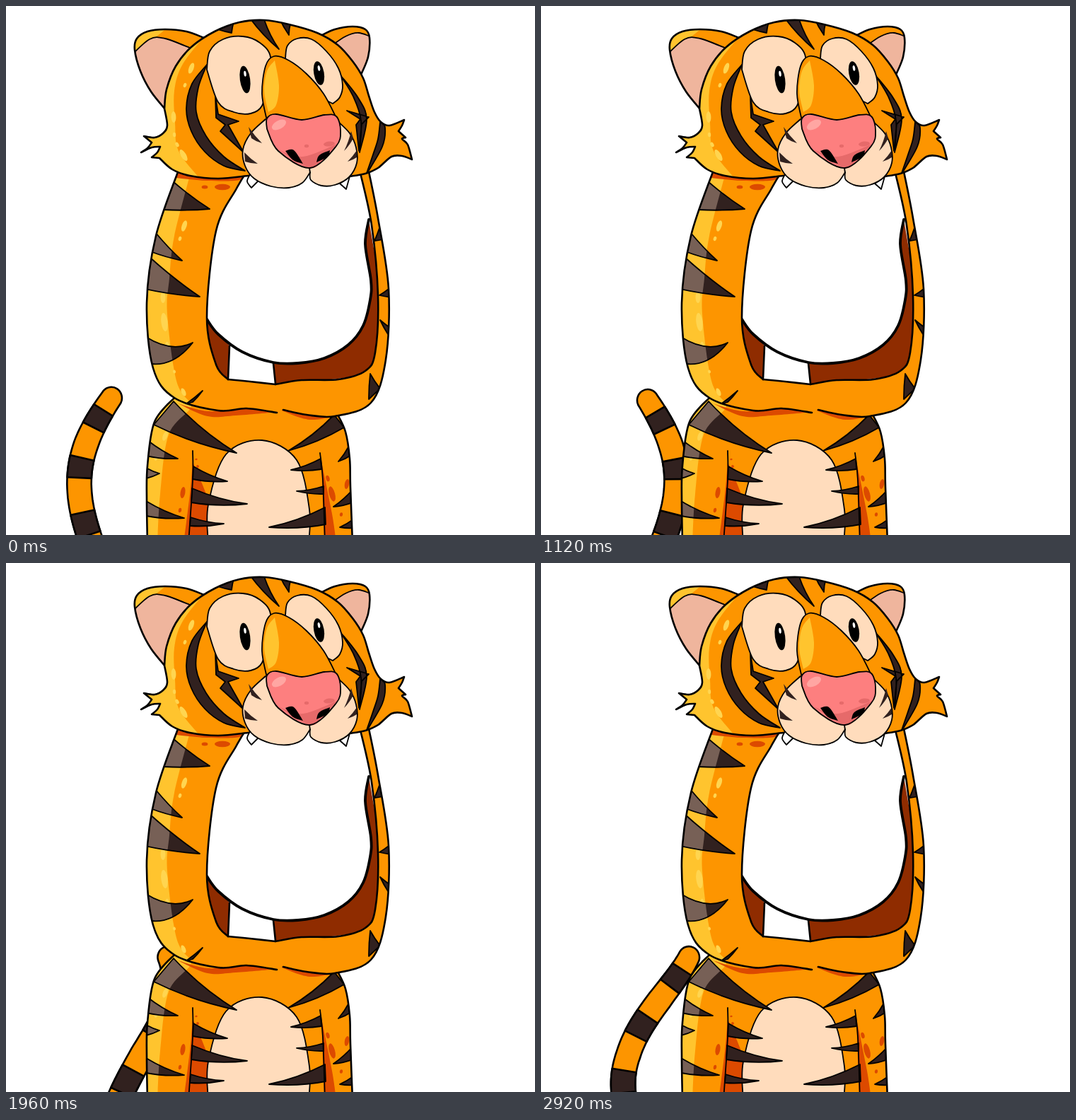
Write an HTML page that moves like this. It is 748 px wide and 748 px high and loops after 3 s.

```html
<!DOCTYPE html>
<html lang="en">
<head>
<meta charset="utf-8">
<title>Tiger</title>
<style>
html, body { margin: 0; width: 100%; height: 100%; overflow: hidden; background: #fff; }
svg { display: block; width: 100vw; height: 100vh; }
.line { fill: none; stroke: #000; stroke-width: 2.6; stroke-linecap: round; stroke-linejoin: round; }
.thin { stroke-width: 1.8; }
</style>
</head>
<body>
<svg id="stage" viewBox="0 0 748 748" xmlns="http://www.w3.org/2000/svg"></svg>
<script>
const C = {
  orange: '#fd9500', gold: '#ffc42e', glow: '#ffd550', dark: '#31211f', tint: '#776056',
  cream: '#ffdcbc', ear: '#efb59d', rust: '#dc4a00', brown: '#8f2c00',
  nose: '#fd7f7f', noseDark: '#e66a6a', noseLight: '#ffa6a2'
};
const stage = document.getElementById('stage');
const points = s => s.trim().split(/\s+/).map(p => p.split(',').map(Number));

// Smooth curve through points; "/" marks a corner.
function curve(text, close) {
  let last = null, d = '';
  text.split('/').forEach(part => {
    const p = points(part);
    if (last) p.unshift(last);
    else d = 'M' + p[0];
    for (let i = 0; i < p.length - 1; i++) {
      const a = p[i - 1] || p[i], b = p[i], c = p[i + 1], e = p[i + 2] || c;
      d += `C${b[0] + (c[0] - a[0]) / 6},${b[1] + (c[1] - a[1]) / 6} ` +
           `${c[0] - (e[0] - b[0]) / 6},${c[1] - (e[1] - b[1]) / 6} ${c}`;
    }
    last = p[p.length - 1];
  });
  return d + (close ? 'Z' : '');
}

// Curves linked by straight lines.
const join = (first, ...rest) =>
  first + rest.map(s => ' / ' + s.replace(' ', ' / ')).join('');

// Pointed stripe: base corner, tip, base corner; both edges sag by the same share of its length.
function leaf(text, sag = .07) {
  const [a, tip, b] = points(text);
  const dx = tip[0] - (a[0] + b[0]) / 2, dy = tip[1] - (a[1] + b[1]) / 2, k = sag * Math.sign(dx);
  const bend = p => [(p[0] + tip[0]) / 2 - dy * k, (p[1] + tip[1]) / 2 + dx * k];
  return `M${a}Q${bend(a)} ${tip}Q${bend(b)} ${b}Z`;
}
const shape = (text, color) => `<path d="${curve(text, true)}" fill="${color}"/>`;
const stroke = (text, cls = '') => `<path d="${curve(text)}" class="line ${cls}"/>`;
const inked = (text, color, cls = '') =>
  `<path d="${curve(text, true)}" class="line ${cls}" style="fill:${color}"/>`;
const oval = (x, y, rx, ry, color, turn = 0) =>
  `<ellipse cx="${x}" cy="${y}" rx="${rx}" ry="${ry}" fill="${color}" transform="rotate(${turn} ${x} ${y})"/>`;

// Spots that shrink along a line.
function trail(text, n, size, color) {
  const [a, b] = points(text), dx = b[0] - a[0], dy = b[1] - a[1];
  const turn = Math.atan2(dy, dx) * 180 / Math.PI;
  let out = '';
  for (let i = 0; i < n; i++) {
    const u = i / (n - 1), r = size * (1 - .6 * u);
    out += oval(a[0] + dx * u, a[1] + dy * u, r, r * .25 + 1.4, color, turn);
  }
  return out;
}

// Filled form with an optional lit edge, and marks that pale under the light.
function form(id, outline, light, marks, extra) {
  const clip = (name, text) => `<clipPath id="${name}"><path d="${curve(text, true)}"/></clipPath>`;
  const d = marks.join('');
  return clip(id, outline) + (light ? clip(id + 'Lit', light) : '') +
    `<g clip-path="url(#${id})">${shape(outline, C.orange)}${light ? shape(light, C.gold) : ''}${extra}
    <path d="${d}" fill="${C.dark}"/>
    ${light ? `<path d="${d}" fill="${C.tint}" clip-path="url(#${id}Lit)"/>` : ''}
    <path d="${d}" class="line thin"/></g>`;
}

function body() {
  const left = '240,552 210,588 200,650 199,700 200,760';
  const right = '490,760 487,680 486,640 480,602 468,576';
  const belly = '286,760 286,705 311,634 362,614 411,642 429,712 428,760';
  const light = '245,545 / 262,566 230,606 218,690 214,760 / 190,760 / 190,545';
  const stripes = [
    '237,559 326,632 209,592', '200,614 243,640 198,636', '198,653 217,661 198,668', '198,700 252,724 198,721',
    '265,651 313,672 264,669', '263,682 341,704 262,702', '261,723 308,732 260,735',
    '464,578 399,629 478,596', '445,640 403,656 446,655', '449,679 411,686 449,690', '451,709 372,737 452,733',
    '485,622 470,644 488,635', '490,684 463,708 490,702', '492,725 472,737 492,738'
  ].map(s => leaf(s));
  const extra =
    shape('264,645 275,670 287,700 / 288,760 / 251,760 / 260,690 264,645', C.rust) +
    shape('446,644 461,718 467,760 / 450,760 / 446,644', C.rust) +
    shape('243,562 285,573 340,569 385,574 / 325,579 285,580 243,562', C.rust) +
    shape('385,570 430,577 476,577 / 430,585 385,570', C.rust) +
    trail('273,661 269,641', 3, 3, C.rust) + trail('250,688 246,713', 2, 8, C.rust) +
    trail('461,690 455,668', 2, 11, C.rust) + trail('482,676 474,719', 2, 7, C.rust) +
    trail('225,608 212,640', 2, 7, C.glow) + inked(belly, C.cream, 'thin');
  return form('body', join(left, right), light, stripes, extra) + stroke(left) + stroke(right) +
    stroke('264,629 264,670 258,760', 'thin') + stroke('444,632 448,670 451,760', 'thin');
}

function arms() {
  const outL = '244,232 212,325 199,420 208,512 238,554 300,572 340,569 383,575';
  const outR = '392,571 425,578 465,580 516,561 537,500 541,400 526,300 513,234';
  const inR = '500,232 517,310 526,410 522,490 508,516 470,528 418,529 381,535';
  const inL = '314,528 297,507 284,440 297,318 326,258 342,232';
  const rim = '284,443 300,464 334,489 378,504 413,505 450,498 484,479 505,452 515,415 516,388 508,337 513,302';
  const light = '262,232 / 238,325 231,385 228,435 241,530 262,562 / 190,570 / 190,232';
  const stripes = [
    '236,248 288,287 222,288', '212,321 249,360 204,347', '203,355 274,411 196,400',
    '254,563 278,544 264,560', '528,314 521,332 533,330', '545,397 528,409 545,412',
    '545,456 529,444 540,464', '513,556 515,520 529,541'
  ].map(s => leaf(s, .04)).concat(leaf('198,468 264,476 205,506', .3));
  const extra =
    shape('240,234 / 342,234 / 330,246 285,247 240,243', C.rust) +
    trail('306,256 281,256', 2, 11, C.rust) +
    trail('254,269 251,282', 2, 7, C.glow) + trail('252,311 246,329', 2, 8, C.glow) +
    trail('224,447 228,480', 2, 13, C.glow) + oval(222, 412, 3.5, 8, C.glow) +
    trail('251,546 238,517', 2, 6, C.glow);
  return shape('284,443 299,463 316,480 / 314,529 / 284,510', C.brown) +
    shape(rim.slice(rim.indexOf('378')) + ' / 530,400 / 529,520 / 381,537', C.brown) +
    `<path d="${curve(rim)}" class="line" style="stroke-width:3.8"/>` +
    stroke('316,481 314,528') + stroke('378,505 381,534') +
    form('arms', join(outL, outR, inR, inL), light, stripes, extra) +
    [outL, outR, inR, inL, '314,528 345,531 381,535'].map(s => stroke(s)).join('');
}

function ears() {
  const left = '280,45 255,36 225,33 200,36 185,46 182,62 190,92 205,121 226,147 / 270,80';
  const right = '445,42 465,33 490,29 508,33 514,45 512,72 502,97 / 470,70';
  return form('earL', left, '175,25 / 235,25 / 190,62 / 175,70', [],
      inked('175,72 203,47 225,46 262,60 / 262,170 / 170,170', C.ear, 'thin')) + stroke(left) +
    form('earR', right, '', [], inked('455,60 480,43 499,38 522,46 / 522,110 / 455,110', C.ear, 'thin')) + stroke(right);
}

function head() {
  const outline = '224,145 227,118 240,85 262,58 295,36 330,23 365,20 400,26 440,38 469,55 490,78 505,102 513,127 521,150 530,164 542,169 563,161 / ' +
    '560,169 555,177 / 565,186 / 560,188 568,196 574,217 / 560,212 545,213 526,229 508,237 486,241 / 430,235 / 342,240 ' +
    '/ 300,244 260,240 235,231 217,215 / 206,214 / 214,207 218,199 / 206,200 191,207 / 200,201 206,193 / 195,184 / 210,186 222,180 228,169 224,145';
  const light = '285,38 / 250,82 238,120 239,165 244,205 275,245 / 185,250 / 185,38';
  const marks = [
    '284,83 263,110 255,145 262,177 281,206 308,226 338,233 / 308,213 283,184 269,150 272,115 284,83',
    '296,127 300,153 / 329,163 / 314,168 / 336,207 / 303,177 / 310,168 / 297,158 / 296,127',
    '473,98 498,130 510,160 500,207 / 502,162 491,128 473,98',
    '482,148 / 513,157 / 503,167 / 499,205 / 495,168 / 501,160 / 482,148',
    '529,164 536,172 532,199 509,239 / 519,210 526,188 529,164'
  ].map(s => curve(s, true))
    .concat(['344,16 386,61 364,16', '386,16 400,41 403,22', '299,33 319,38 322,22'].map(s => leaf(s)));
  const extra = trail('262,88 253,112', 2, 8, C.glow) + trail('237,157 238,182', 2, 8, C.glow) +
    trail('251,211 242,196', 2, 9, C.glow);
  return form('head', outline, light, marks, extra) + stroke(outline);
}

function face() {
  const muzzle = '367,160 346,180 335,203 338,226 351,244 375,255 400,257 419,250 430,235 / ' +
    '431,246 446,254 465,253 485,242 496,222 495,200 486,180 468,162';
  const nose = '369,174 369,159 382,153 418,161 450,154 467,156 473,176 467,198 430,229 385,205 369,174';
  const whiskers = ['343,171 362,194 347,187', '337,207 356,223 338,220', '488,177 478,205 491,187', '496,204 483,220 496,214'];
  return inked('345,238 341,248 347,257 / 358,246', '#fff', 'thin') +
    inked('472,251 481,259 / 486,241', '#fff', 'thin') +
    inked('284,90 288,64 307,47 335,43 359,52 374,72 369,110 362,141 346,152 322,150 300,136 284,90', C.cream, 'thin') +
    inked('395,74 398,56 412,46 432,47 453,64 470,88 476,112 472,129 462,138 / 425,120', C.cream, 'thin') +
    '<g id="eyes"></g>' +
    shape(muzzle, C.cream) + stroke(muzzle, 'thin') +
    `<path d="${whiskers.map(s => leaf(s)).join('')}" fill="${C.dark}"/>` +
    inked('369,162 362,124 367,85 379,71 400,77 425,96 449,124 467,158 / 420,170', C.orange, 'thin') +
    shape('380,77 369,92 365,120 371,150 / 382,140 386,112 380,77', C.gold) +
    shape(nose, C.nose) + shape('385,203 420,213 468,195 / 448,216 430,229 385,203', C.noseDark) +
    oval(386, 168, 11, 6, C.noseLight, -28) + trail('457,195 425,198', 2, 8, C.noseDark) +
    shape('395,205 407,204 420,223 / 406,218 395,205', '#000') +
    shape('439,221 443,211 458,204 / 455,213 439,221', '#000') +
    stroke(nose, 'thin') + stroke('429,229 430,236', 'thin');
}

// Point on the tail: u runs from tip (0) to root (6); the wave lags towards the tip.
function spine(u, phase) {
  const a = 2 * Math.PI * phase;
  const lift = 4 - 18 * Math.max(0, Math.cos(a - .2 * Math.PI)) ** 8;
  return [
    150 - .7 * u - 44 * Math.sin(.45 * u) * Math.cos(a) - (52 + 66 * Math.cos(.52 * u)) * Math.sin(a) +
      Math.max(0, 10 - 2.5 * u) * Math.sin(2 * a),
    552 + 30 * u + 1.2 * u * u + lift * (1 - u / 8)
  ];
}

function tail(phase) {
  const edge = (u, side) => {
    const a = spine(u - .05, phase), b = spine(u + .05, phase), c = spine(u, phase);
    const dx = b[0] - a[0], dy = b[1] - a[1];
    const r = side * (15 + 2.2 * Math.min(1, u / 2)) / Math.hypot(dx, dy);
    return [c[0] - dy * r, c[1] + dx * r].map(x => x.toFixed(1)).join();
  };
  const band = (from, to, cap, color) => {
    const one = [], two = [];
    for (let i = 0; i <= 40; i++) {
      const u = from + (to - from) * i / 40;
      one.push(edge(u, 1));
      two.unshift(edge(u, -1));
    }
    return `<path d="M${one.join('L')}L${two.join('L')}${cap}${one[0]}Z" class="line" style="fill:${color}"/>`;
  };
  const stripe = i => band(.61 + 2 * i, 1.37 + 2 * i, 'L', C.dark);
  return band(0, 6, 'A15,15.5 0 0 0 ', C.orange) + [0, 1, 2].map(stripe).join('');
}

function eyes(shut) {
  const pupil = (id, x, y, h, turn) => {
    const cut = y - h - 3 + shut * (2 * h + 4);
    const art = oval(x, y, 7.2, h, '#000', turn) + oval(x, y - h * .42, 1.7, 4, '#fff', turn);
    return `<clipPath id="${id}"><path d="M${x - 14},${cut + 4}L${x + 14},${cut - 4}V${y + 40}H${x - 14}Z"/></clipPath>` +
      `<g ${shut ? `clip-path="url(#${id})"` : ''}>${art}</g>`;
  };
  return pupil('lidL', 338, 104, 19.5, -8) + pupil('lidR', 442.5, 95, 17, -10);
}

stage.innerHTML = '<g id="tail"></g>' + body() + arms() + ears() + head() + face();
const tailBox = document.getElementById('tail'), eyeBox = document.getElementById('eyes');
let lastStep = -1, lastShut = -1;

// Eight tail steps per 600 ms, ten steps per swing; one blink around 920 ms.
function draw(t) {
  const m = t % 600;
  const step = 8 * Math.floor(t / 600) + (m < 80 ? 0 : m < 120 ? 1 : 2 + Math.floor((m - 120) / 80));
  if (step !== lastStep) {
    tailBox.innerHTML = tail(step % 10 / 10);
    lastStep = step;
  }
  const tick = Math.floor(t / 40) * 40;
  const shut = Math.max(0, 1 - Math.abs(tick - 920) / 120);
  if (shut !== lastShut) {
    eyeBox.innerHTML = eyes(shut);
    lastShut = shut;
  }
}

const start = performance.now();
function loop() {
  draw((performance.now() - start) % 3000);
  requestAnimationFrame(loop);
}
loop();
</script>
</body>
</html>
```
